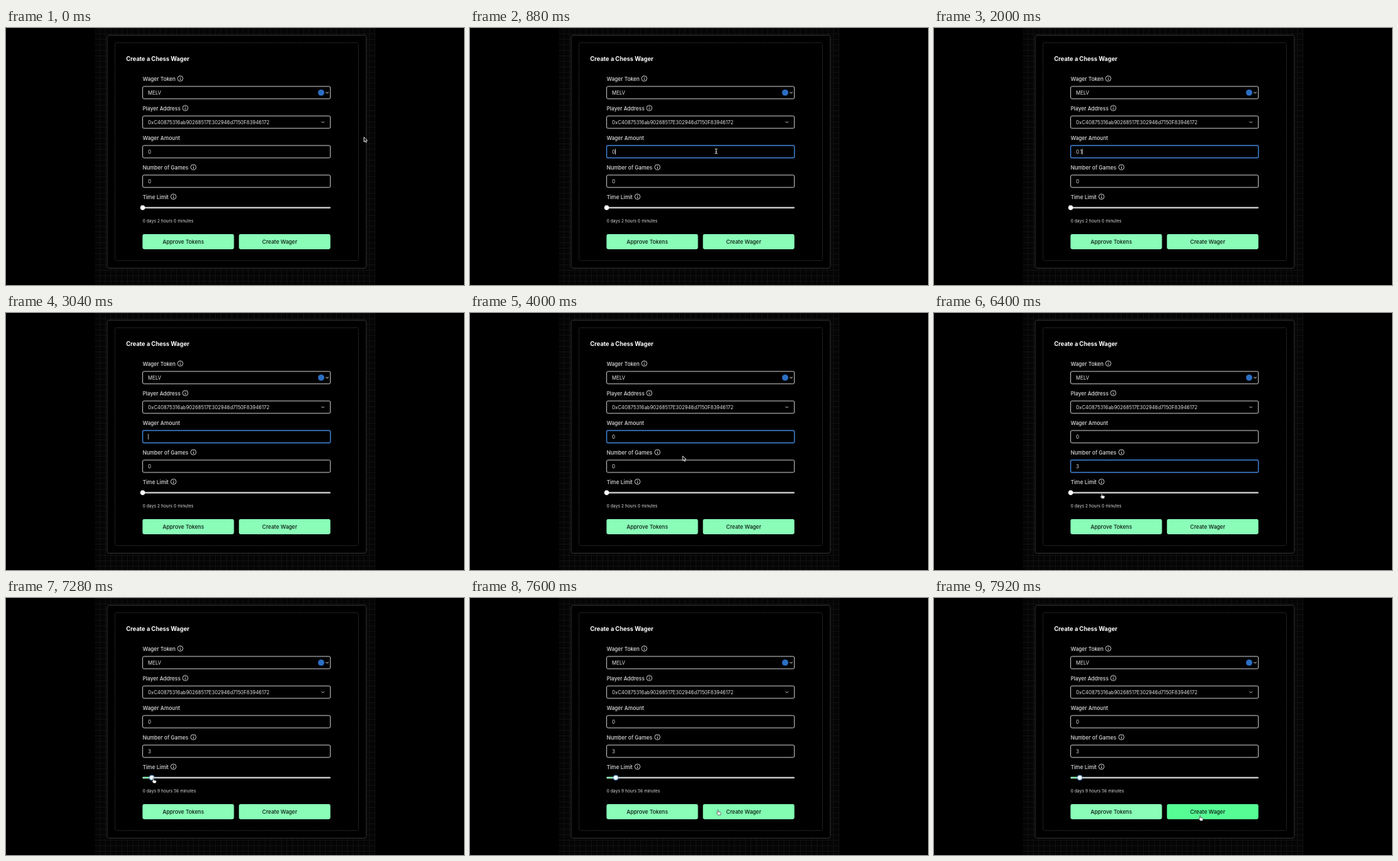
Recreate the animation shown at these times as an HTML page. Size 666 by 374 pixels, loop 8 s.

```html
<!DOCTYPE html>
<html lang="en">
<head>
<meta charset="utf-8">
<title>Create a Chess Wager</title>
<style>
  html, body { margin: 0; height: 100%; overflow: hidden; background: #000; }
  svg { display: block; width: 666px; height: 374px; font-family: Inter, "Liberation Sans", sans-serif; }
  .title { font-size: 8.5px; font-weight: 700; fill: #fff; }
  .label { font-size: 7.65px; font-weight: 500; fill: #dcdcdc; }
  .value { font-size: 7.1px; fill: #e4e4e4; }
  .small { font-size: 6.2px; fill: #d6d6d6; }
  .action { font-size: 7.75px; font-weight: 500; fill: #0c1a12; text-anchor: middle; }
  .line { fill: none; stroke: #dcdcdc; stroke-width: .9; }
  .field { fill: #000; stroke: #c8c8c8; stroke-width: 1; }
</style>
</head>
<body>
<svg id="stage" viewBox="0 0 666 374">
  <defs>
    <pattern id="grid" width="8" height="8" patternUnits="userSpaceOnUse">
      <path d="M.5 0V8M0 .5H8" stroke="#101010" fill="none"/>
    </pattern>
  </defs>
  <rect x="129" width="408" height="374" fill="#050505"/>
  <rect x="129" width="408" height="374" fill="url(#grid)"/>
  <rect x="147" y="10.5" width="377" height="339" rx="3" fill="#000" stroke="#303030"/>
  <rect x="158.5" y="21.5" width="354" height="317" rx="2" fill="none" stroke="#3c3c3c" stroke-width=".8" stroke-dasharray="1.5 1"/>
  <text class="title" x="174.7" y="47.8">Create a Chess Wager</text>
  <g id="form"></g>

  <circle cx="458.3" cy="94" r="4.6" fill="#2b6fc4"/>
  <path class="line" d="M465 93l2 2 2-2M458.7 136l2 2 2-2"/>
  <rect id="caret" width=".8" height="8.5" fill="#e8e8e8"/>

  <rect x="198.5" y="260.4" width="273.5" height="2.2" rx="1" fill="#e2e4e8"/>
  <rect id="fill" x="198.5" y="260.4" height="2.2" rx="1" fill="#7df0ad"/>
  <circle id="thumb" cy="261.5" r="3.4" fill="#fff" stroke="#5f9fd8" stroke-opacity=".8"/>
  <text id="limit" class="small" x="198.7" y="283"></text>

  <rect x="198.5" y="300" width="133" height="22" rx="2.4" fill="#8afdb8"/>
  <rect id="create" x="338.7" y="300" width="133" height="22" rx="2.4"/>
  <text class="action" x="257.8" y="314">Approve Tokens</text>
  <text class="action" x="398" y="314">Create Wager</text>

  <path id="arrow" d="M0 0V7L1.6 5.6L2.7 8L3.9 7.5L2.8 5.1H5Z" fill="#111" stroke="#fff" stroke-width=".8"/>
  <path id="beam" d="M-2-3.5Q0-3.5 0-2.5Q0-3.5 2-3.5M0-2.5V2.5M-2 3.5Q0 3.5 0 2.5Q0 3.5 2 3.5M-1 .8H1" fill="none" stroke="#e8e8e8" stroke-width=".9"/>
  <path id="hand" d="M-.7.5Q0-.6.7.5V3L3.6 3.6Q4.6 4 4.3 5.2L3.6 7.6H.1L-2 4.8Q-2 3.6-.7 4.4Z" fill="#fff" stroke="#222" stroke-width=".6"/>
</svg>
<script>
const $ = id => document.getElementById(id);
const LOOP = 8000;

const rows = [
  ["Wager Token", 94, 253.4, "MELV"],
  ["Player Address", 137, 260.7, "0xC40875316ab90268517E302946d7150F83946172"],
  ["Wager Amount", 180, 0, "0"],
  ["Number of Games", 223, 272.5, "0"],
];

const label = (text, y, iconX) => `
  <text class="label" x="198.7" y="${y + 2.8}">${text}</text>` + (iconX ? `
  <circle class="line" cx="${iconX}" cy="${y - .5}" r="3.9"/>
  <path class="line" d="M${iconX} ${y - 1}v2.8m0-4.8v1"/>` : "");

$("form").innerHTML = rows.map(([text, y, iconX, value], i) => label(text, y - 20, iconX) + `
  <rect id="box${i}" class="field" x="198.7" y="${y - 9}" width="273" height="18" rx="2"/>
  <text id="value${i}" class="value" x="206.6" y="${y + 2.6}">${value}</text>`).join("") +
  label("Time Limit", 246, 243.5);

// [time, text] for the two editable fields
const amountKeys = [[0, "0"], [1040, ""], [1280, "0"], [1360, "0."], [1520, "0.1"],
  [2480, "0."], [2640, "0"], [2800, ""], [3280, "0"]];
const gameKeys = [[0, "0"], [5920, "3"]];
const caretOn = [[840, 1280], [1280, 2020], [2480, 3780], [4240, 4320], [4800, 5280], [5760, 6380]];
const hidden = [[1040, 3680], [5920, 6000]];

// [time, x, y] of the pointer's hot spot
const path = [[80, 520.5, 158.7], [800, 358, 179.3], [3680, 358, 179.3], [4240, 277.8, 226.3],
  [6000, 277.8, 226.3], [6380, 244.7, 262.5], [6640, 201, 261.5], [6800, 201, 261.5],
  [7200, 214.3, 262], [7360, 214.3, 262], [7680, 387, 316.6]];

const clamp = v => Math.max(0, Math.min(1, v));
const ease = v => v * v * (3 - 2 * v);
const during = (t, spans) => spans.some(([a, b]) => t >= a && t < b);
const textAt = (t, keys) => keys.filter(k => k[0] <= t).pop()[1];

function pointerAt(t) {
  let [, x, y] = path[0];
  for (let i = 1; i < path.length; i++) {
    const [start, x0, y0] = path[i - 1], [end, x1, y1] = path[i];
    if (t < start) break;
    const k = ease(clamp((t - start) / (end - start)));
    x = x0 + (x1 - x0) * k;
    y = y0 + (y1 - y0) * k;
  }
  return [x, y];
}

function drawFields(t) {
  $("value2").textContent = textAt(t, amountKeys);
  $("value3").textContent = textAt(t, gameKeys);
  const focus = t >= 840 && t < 4240 ? 2 : t >= 4240 && t < 6720 ? 3 : 0;
  for (const i of [2, 3]) {
    $("box" + i).style.stroke = i === focus ? "#3e7fd0" : "";
    $("box" + i).style.strokeWidth = i === focus ? 1.4 : "";
  }
  const caret = $("caret");
  caret.style.display = focus && during(t, caretOn) ? "" : "none";
  if (focus) {
    const text = $("value" + focus);
    const width = text.textContent ? text.getComputedTextLength() : 0;
    caret.setAttribute("x", 206.6 + width);
    caret.setAttribute("y", rows[focus][1] - 4.3);
  }
}

function drawSlider(t) {
  const drag = ease(clamp((t - 6800) / 400));
  const minutes = 120 + Math.round(476 * drag);
  $("fill").setAttribute("width", 13.3 * drag);
  $("thumb").setAttribute("cx", 198.7 + 13.3 * drag);
  $("thumb").setAttribute("stroke-width", t >= 6720 ? 1.2 : 0);
  $("limit").textContent = `0 days ${Math.floor(minutes / 60)} hours ${minutes % 60} minutes`;
}

function drawPointer(t) {
  const [x, y] = pointerAt(t);
  const overField = x > 198 && x < 472 && rows.slice(2).some(r => Math.abs(y - r[1]) < 9);
  const overButton = x > 338 && x < 472 && y > 300 && y < 322;
  const overSlider = x < 472 && Math.abs(y - 261.5) < 4;
  const shape = overField ? "beam" : overButton || overSlider ? "hand" : "arrow";
  for (const id of ["arrow", "beam", "hand"]) {
    $(id).style.display = id === shape && !during(t, hidden) ? "" : "none";
    $(id).setAttribute("transform", `translate(${x} ${y})`);
  }
  const hover = clamp((t - 7570) / 200);
  const mix = (a, b) => Math.round(a + (b - a) * hover);
  $("create").setAttribute("fill", `rgb(${mix(138, 86)},253,${mix(184, 148)})`);
}

function frame(now) {
  const t = now % LOOP;
  drawFields(t);
  drawSlider(t);
  drawPointer(t);
  requestAnimationFrame(frame);
}
requestAnimationFrame(frame);
</script>
</body>
</html>
```
